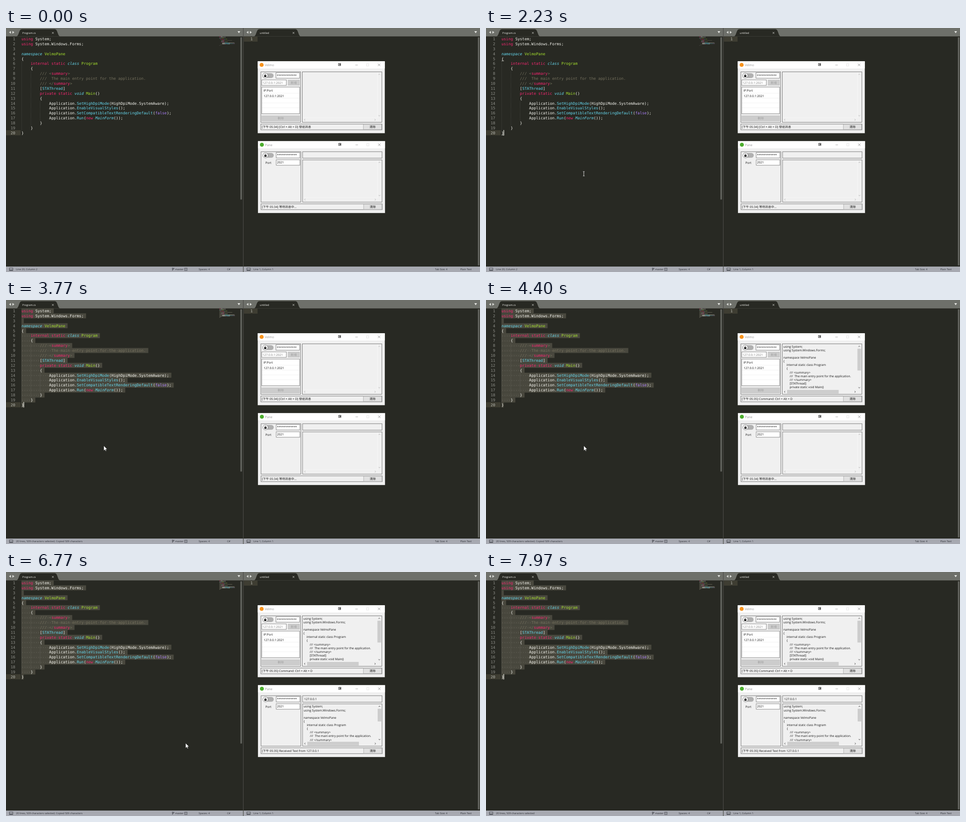
Recreate the animation shown at these times as an HTML page with a canvas. Size 1042x537 px, loop 8 s.

```html
<!DOCTYPE html>
<html lang="en">
<head>
<meta charset="utf-8">
<title>Text relay</title>
<style>
html, body { margin: 0; width: 100%; height: 100%; overflow: hidden; background: #282923; }
canvas { display: block; width: 1042px; height: 537px; }
</style>
</head>
<body>
<canvas id="stage" width="1042" height="537"></canvas>
<script>
const ctx = document.getElementById('stage').getContext('2d');
const LOOP = 8000;
const UI = '"Open Sans", "Noto Sans CJK TC", "Noto Sans CJK", sans-serif';
const MONO = '"DejaVu Sans Mono", monospace';
const CODE_X = 34, CODE_Y = 24, COL = 5.07, ROW = 10.89, CODE_SIZE = 8.42;
const BG = '#282923';

// Token keys: p keyword, w plain, i italic type, b call, g name, c comment, v constant
const COLORS = { p: '#f92672', w: '#f8f8f2', i: '#66d9ef', b: '#66d9ef', g: '#a6e22e', c: '#75715e', v: '#ae81ff' };
const CODE = [
  '`pusing`w System;',
  '`pusing`w System.Windows.Forms;',
  '',
  '`inamespace`g VelmoPane',
  '`w{',
  '`p    internal static`i class`g Program',
  '`w    {',
  '`c        /// <`psummary`c>',
  '`c        ///  The main entry point for the application.',
  '`c        /// </`psummary`c>',
  '`w        [`bSTAThread`w]',
  '`p        private static`i void`g Main`w()',
  '`w        {',
  '`w            Application.`bSetHighDpiMode`w(HighDpiMode.SystemAware);',
  '`w            Application.`bEnableVisualStyles`w();',
  '`w            Application.`bSetCompatibleTextRenderingDefault`w(`vfalse`w);',
  '`w            Application.`bRun`w(`pnew`i MainForm`w());',
  '`w        }',
  '`w    }',
  '`w}'
].map(line => {
  let col = 0;
  return line.split('`').slice(1).map(part => {
    const token = { key: part[0], text: part.slice(1), col };
    col += token.text.length;
    return token;
  });
});
const PLAIN = CODE.map(line => line.map(token => token.text).join(''));

const clamp = v => Math.max(0, Math.min(1, v));
const mix = (a, b, k) => a + (b - a) * k;

function rect(x, y, w, h, fill, stroke) {
  if (fill) { ctx.fillStyle = fill; ctx.fillRect(x, y, w, h); }
  if (stroke) {
    ctx.strokeStyle = stroke;
    ctx.lineWidth = 0.9;
    ctx.strokeRect(x, y, w, h);
  }
}

function path(points, fill, stroke, width = 1) {
  ctx.beginPath();
  for (let i = 0; i < points.length; i += 2) ctx.lineTo(points[i], points[i + 1]);
  if (fill) { ctx.closePath(); ctx.fillStyle = fill; ctx.fill(); }
  if (stroke) { ctx.strokeStyle = stroke; ctx.lineWidth = width; ctx.stroke(); }
}

function circle(x, y, r, fill, stroke) {
  ctx.beginPath();
  ctx.arc(x, y, r, 0, 7);
  ctx.fillStyle = fill;
  ctx.fill();
  if (stroke) { ctx.strokeStyle = stroke; ctx.lineWidth = 0.8; ctx.stroke(); }
}

// y is the optical middle of the line
function label(text, x, y, color = '#111', size = 6.6, align = 'left') {
  ctx.font = `${size}px ${UI}`;
  ctx.textAlign = align;
  ctx.fillStyle = color;
  ctx.fillText(text, x, y + size * 0.36);
}

function mono(text, x, y, color, italic, align = 'left') {
  ctx.font = `${italic ? 'italic ' : ''}${CODE_SIZE}px ${MONO}`;
  ctx.textAlign = align;
  ctx.fillStyle = color;
  ctx.fillText(text, x, y + 3);
}

function cross(x, y, r, color) {
  path([x - r, y - r, x + r, y + r], null, color, 0.9);
  path([x - r, y + r, x + r, y - r], null, color, 0.9);
}

// Editor windows

function editorFrame(x, w, tabRight, title) {
  rect(x, 0, w, 537, BG);
  rect(x, 0, w, 18.5, '#6e706a');
  ctx.beginPath();
  ctx.moveTo(x + 23, 18.6);
  ctx.bezierCurveTo(x + 29, 17, x + 28, 2.5, x + 35, 2.5);
  ctx.lineTo(tabRight - 11, 2.5);
  ctx.bezierCurveTo(tabRight - 4, 2.5, tabRight - 5, 17, tabRight + 1, 18.6);
  ctx.fillStyle = BG;
  ctx.fill();
  path([x + 11, 6.5, x + 11, 12.5, x + 6.5, 9.5], '#d6d7d3');
  path([x + 14, 6.5, x + 14, 12.5, x + 18.5, 9.5], '#d6d7d3');
  path([x + w - 12.5, 7, x + w - 6.5, 7, x + w - 9.5, 11.5], '#e4e5e1');
  label(title, x + 36, 10.5, '#f2f2ee', 5.65);
  cross(tabRight - 15, 10.8, 1.9, '#c9cac5');
  rect(x, 525, w, 12, '#a7a9b1');
  rect(x + 7.5, 528.2, 7.5, 5.6, null, '#45474e');
  rect(x + 8, 532, 6.5, 1.5, '#45474e');
}

function status(text, x) { label(text, x, 531.2, '#34363d', 5.65); }

function selection() {
  PLAIN.forEach((line, i) => {
    const cols = line.length + (i < PLAIN.length - 1 ? 1 : 0);
    rect(CODE_X, CODE_Y - 5.5 + i * ROW, cols * COL, ROW + 0.1, '#49483e');
  });
}

function guides() {
  ctx.setLineDash([1, 1]);
  [[0, 5, 19], [4, 7, 18], [8, 13, 17]].forEach(([col, from, to]) => {
    const x = CODE_X + 0.5 + col * COL;
    path([x, CODE_Y - 5 + from * ROW, x, CODE_Y - 5 + to * ROW], null, 'rgba(255,255,255,.14)');
  });
  ctx.setLineDash([]);
}

function codeText(selected) {
  CODE.forEach((line, i) => {
    const y = CODE_Y + i * ROW;
    mono(i + 1, 20.3, y, i === 19 ? '#b9bab3' : '#90918b', false, 'right');
    line.forEach(({ key, text, col }) => {
      const lead = text.length - text.trimStart().length;
      mono(text.trimStart(), CODE_X + (col + lead) * COL, y, COLORS[key], key === 'i');
    });
    if (!selected) return;
    [...PLAIN[i]].forEach((ch, col) => {
      if (ch === ' ') rect(CODE_X + col * COL + 2.1, y + 0.2, 0.9, 0.9, '#83827a');
    });
  });
}

function minimap(selected, hover) {
  const x = 469, y = 18.6, cw = 0.52, rh = 1.02;
  if (hover) rect(x, y, 45, 47, 'rgba(255,255,255,.08)');
  CODE.forEach((line, i) => {
    if (selected) rect(x, y + i * rh, (PLAIN[i].length + 1) * cw, rh, '#49483e');
    ctx.globalAlpha = 0.55;
    line.forEach(({ key, text, col }) => {
      const body = text.trimStart();
      rect(x + (col + text.length - body.length) * cw, y + i * rh + 0.15, body.length * cw, 0.7, COLORS[key]);
    });
    ctx.globalAlpha = 1;
  });
}

function leftEditor(t, pointer) {
  const selected = t >= 2570;
  editorFrame(0, 521.5, 118, 'Program.cs');
  rect(0, 225, 32, 11.2, '#3e3d32');
  if (selected) selection();
  guides();
  codeText(selected);
  if (t >= 1270 && !selected) {
    [4, 19].forEach(i => rect(CODE_X + 0.3, CODE_Y + 4.3 + i * ROW, COL, 0.9, '#d5d5cf'));
  }
  minimap(selected, pointer.x >= 469 && pointer.x <= 514 && pointer.y < 525);
  rect(515.2, 20.5, 3.6, 357, '#62635e');

  const caret = caretAlpha(t);
  if (caret > 0) {
    ctx.globalAlpha = caret;
    rect(38.4, 224.6, 1.3, 11.9, '#f8f8f0');
    ctx.globalAlpha = 1;
  }

  const copied = t >= 3370 && t < 7370;
  status(!selected ? 'Line 20, Column 2'
    : '20 lines, 509 characters selected' + (copied ? '; Copied 509 characters' : ''), 22);
  path([366, 528.5, 366, 534], null, '#34363d', 0.9);
  path([366, 532, 368.8, 530.5, 368.8, 529], null, '#34363d', 0.9);
  circle(366, 528.6, 0.9, '#34363d');
  circle(368.8, 528.8, 0.9, '#34363d');
  status('master', 371.8);
  rect(392.8, 528.4, 5.2, 5.4, null, '#4a4c53');
  label('1', 395.4, 531.2, '#34363d', 4.5, 'center');
  status('Spaces: 4', 423.5);
  status('C#', 486);
}

function rightEditor() {
  editorFrame(522, 520, 647, 'untitled');
  rect(523, 19, 30, 11, '#3e3d32');
  mono(1, 542.3, CODE_Y, '#b9bab3', false, 'right');
  rect(1037.3, 20.5, 3.6, 502, '#62635e');
  rect(521, 0, 1.2, 537, '#4b4c47');
  status('Line 1, Column 1', 544);
  status('Tab Size: 4', 943);
  status('Plain Text', 998.5);
}

// Dialog windows

const EDGE = '#6b6b6b';

function field(x, y, w, h, text, color) {
  rect(x, y, w, h, '#fff', '#7a7a7a');
  label(text, x + 1.8, y + h / 2, color);
}

function button(x, y, w, h, text, enabled) {
  rect(x, y, w, h, enabled ? '#e1e1e1' : '#cccccc', enabled ? '#adadad' : '#bfbfbf');
  label(text, x + w / 2, y + h / 2, enabled ? '#111' : '#9d9d9d', 6.6, 'center');
}

function toggle(x, y) {
  ctx.beginPath();
  ctx.roundRect(x, y - 5.3, 23.5, 10.6, 5.3);
  ctx.fillStyle = '#b0b0b0';
  ctx.fill();
  circle(x + 5.3, y, 5.6, '#fff', '#6d6d6d');
  rect(x + 2.9, y - 0.7, 4.8, 3.8, '#111');
  ctx.beginPath();
  ctx.arc(x + 5.3, y - 1, 1.6, Math.PI, 0);
  ctx.strokeStyle = '#111';
  ctx.lineWidth = 0.9;
  ctx.stroke();
}

function dialog(x, y, title, color) {
  rect(x, y, 279.3, 158.3, '#f0f0f0');
  rect(x, y, 279.3, 15.8, '#fff');
  circle(x + 8.6, y + 8, 4.4, color);
  label(title, x + 15.6, y + 8.3, '#929292', 6.9);
  rect(x + 177.5, y + 4.8, 4.8, 4.8, null, '#222');
  rect(x + 179, y + 6.3, 3.2, 1.8, '#222');
  path([x + 214.5, y + 8.3, x + 220, y + 8.3], null, '#999', 0.8);
  rect(x + 239.2, y + 5.7, 4.8, 4.8, null, '#e2e2e2');
  cross(x + 266.8, y + 8, 2.6, '#8a8a8a');
}

function chevron(x, y, dx, dy, color) {
  const r = 1.9, s = 0.9;
  path([x - dy * r - dx * s, y - dx * r - dy * s, x + dx * s, y + dy * s,
    x + dy * r - dx * s, y + dx * r - dy * s], null, color, 1);
}

function textArea(x, y, h, thumb, live, shown) {
  const w = 174.7, color = live ? '#444' : '#b5b5b5';
  rect(x, y, w, h, '#f0f0f0', EDGE);
  if (live) {
    rect(x + 165, y + 10.7, 8, thumb, '#cdcdcd');
    rect(x + 10.3, y + h - 9.6, 113.5, 8, '#cdcdcd');
  } else {
    rect(x + 164.5, y + 1, 0.6, h - 11, '#fafafa');
    rect(x + 1, y + h - 10.3, 164, 0.6, '#fafafa');
  }
  chevron(x + 169, y + 5.6, 0, -1, color);
  chevron(x + 169, y + h - 14.6, 0, 1, color);
  chevron(x + 5.2, y + h - 5.5, -1, 0, color);
  chevron(x + 159.8, y + h - 5.5, 1, 0, color);
  if (!shown) return;
  ctx.save();
  ctx.beginPath();
  ctx.rect(x + 1, y + 1, 163, h - 11.2);
  ctx.clip();
  PLAIN.slice(0, 12).forEach((line, i) => label(line, x + 2.3, y + 5.8 + i * 8.13));
  ctx.restore();
}

function statusRow(x, y, text) {
  rect(x, y, 266.4, 12.8, '#f0f0f0', EDGE);
  label(text, x + 2, y + 6.3);
  button(x + 225.5, y + 0.6, 40, 11.6, '清除', true);
}

function sender(t) {
  dialog(553.4, 73.2, 'Velmo', '#f7931e');
  rect(560.2, 96.5, 87.5, 111, null, EDGE);
  toggle(564.6, 104.7);
  field(593.5, 98.4, 52, 12, '************', '#111');
  field(562.2, 114.2, 54, 12, '127.0.0.1:2021', '#7a7a7a');
  button(620.2, 114.6, 25, 11.4, '新增', false);
  rect(562.2, 130, 83.4, 58.7, '#fff', '#7a7a7a');
  for (let i = 0; i < 4; i++) rect(563, 143.2 + i * 10.7, 82, 0.7, '#ececec');
  label('IP:Port', 566, 137.3);
  label('127.0.0.1:2021', 566.5, 149.2);
  button(562.2, 193.2, 83.4, 11.3, '刪除', false);
  textArea(651.5, 96.5, 111, 48, t >= 4070, t >= 4400);
  statusRow(560.2, 211.3, t >= 4400
    ? '[下午 05:35] Command: Ctrl + Alt + D'
    : '[下午 05:34] [Ctrl + Alt + D] 發送訊息');
}

function receiver(t) {
  const live = t >= 4700;
  dialog(553.9, 248.9, 'Pane', '#4cae2e');
  rect(560.7, 272.2, 87.5, 111, null, EDGE);
  toggle(565.1, 280.3);
  field(594, 274, 52, 12, '************', '#111');
  label('Port', 570.3, 296.3);
  field(594, 290, 52, 12, '2021', '#111');
  rect(652, 272.2, 174.7, 14.2, null, EDGE);
  if (live) label('127.0.0.1', 655.5, 279.8);
  textArea(652, 290.2, 93, 28, live, live);
  statusRow(560.7, 387, live
    ? '[下午 05:35] Received Text from 127.0.0.1'
    : '[下午 05:34] 等待訊息中...');
}

// Motion

// Blink: fade start, fade end, alpha reached
const BLINK = [
  [1269, 1270, 1], [1630, 1730, 0], [2140, 2230, 1], [2569, 2570, 1],
  [3000, 3170, 0], [3570, 3770, 1], [4040, 4200, 0], [4670, 4770, 1],
  [5199, 5200, 0], [5770, 5870, 1], [6170, 6330, 0], [6780, 6870, 1],
  [7270, 7400, 0], [7870, 7970, 1]
];

function caretAlpha(t) {
  return BLINK.reduce((a, [from, to, goal]) => mix(a, goal, clamp((t - from) / (to - from))), 0);
}

function pointerAt(t) {
  if (t < 6500) {
    const k = 1 - (1 - clamp((t - 1240) / 490)) ** 2;
    return { x: mix(519, 215, k), y: mix(540, 320.8, k), beam: t < 3370 };
  }
  const k = clamp((t - 6500) / 770);
  return { x: mix(215, 726, k), y: mix(319.3, 540, k ** 1.29), beam: false };
}

function drawPointer({ x, y, beam }) {
  if (y > 538) return;
  if (beam && y < 525) {
    path([x, y - 4.7, x, y + 4.7], null, '#f4f4f4', 0.9);
    [-4.8, 4.8].forEach(d => path([x - 1.8, y + d, x + 1.8, y + d], null, '#f4f4f4', 0.8));
    return;
  }
  if (beam) y -= 1.5;
  path([x, y, x, y + 10.8, x + 2.5, y + 8.5, x + 4.1, y + 12, x + 5.7, y + 11.3,
    x + 4.2, y + 7.9, x + 7.5, y + 7.7], '#fff', '#111', 0.5);
}

function draw(t) {
  const pointer = pointerAt(t);
  ctx.textRendering = 'geometricPrecision';
  leftEditor(t, pointer);
  rightEditor();
  sender(t);
  receiver(t);
  drawPointer(pointer);
}

function tick() {
  draw(performance.now() % LOOP);
  requestAnimationFrame(tick);
}
tick();
</script>
</body>
</html>
```
